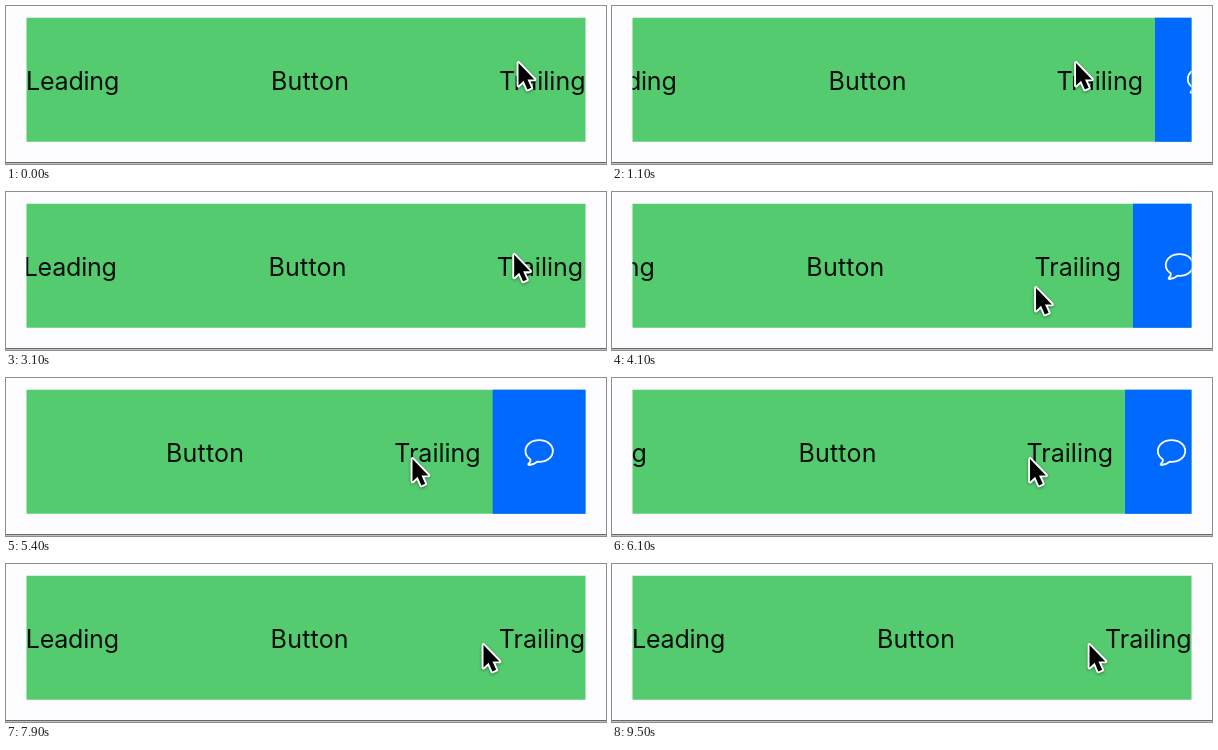
Write an HTML page that moves like this. It is 600 by 158 pixels and loops after 9.6 s.

```html
<!DOCTYPE html>
<html lang="en">
<head>
<meta charset="utf-8">
<title>Swipe action</title>
<style>
  html, body { margin: 0; width: 100%; height: 100%; overflow: hidden; background: #fdfcfe; }
  svg { display: block; width: 600px; height: 158px; }
  text { font: 25px Inter, "Open Sans", sans-serif; fill: #050d08; }
  .cursor { filter: drop-shadow(0 1.5px 1.5px rgba(0, 0, 0, .4)); }
</style>
</head>
<body>
<svg viewBox="0 0 600 158">
  <defs>
    <clipPath id="cell"><rect x="20.5" y="11.8" width="559" height="124"/></clipPath>
  </defs>
  <rect y="156" width="600" height="1.4" fill="#68666a"/>
  <g clip-path="url(#cell)">
    <rect x="20" y="11" width="560" height="126" fill="#55cb6f"/>
    <g id="row">
      <text x="20" y="83.5" letter-spacing="-.2">Leading</text>
      <text x="304" y="83.5" text-anchor="middle" letter-spacing=".2">Button</text>
      <text x="579.5" y="83.5" text-anchor="end">Trailing</text>
      <g transform="translate(591.5 0)">
        <rect y="11" width="120" height="126" fill="#0069ff"/>
        <path d="M37.6 81.2 C34.5 79.2 32.8 76.4 32.8 73 C32.8 66.8 38.8 62.2 46.5 62.2 S60.2 66.8 60.2 73 S54.2 83.8 46.5 83.8 L44.6 83.7 C42.2 85.7 39.4 87 36.4 87 C35.5 87 35.4 86.3 36 85.7 C37.4 84.4 38.3 82.8 37.6 81.2 Z"
              fill="none" stroke="#fff" stroke-width="1.8" stroke-linejoin="round"/>
      </g>
    </g>
  </g>
  <g id="cursor" class="cursor">
    <path d="M1.5 2 V24.5 L6.6 19.8 L10.4 28.4 L14.2 26.8 L10.5 18.4 H17.4 Z"
          fill="#000" stroke="#fff" stroke-width="3.8" paint-order="stroke" stroke-linejoin="round"/>
  </g>
</svg>
<script>
  const LOOP = 9600, STEP = 100;
  const HOME = { x: 511, y: 55 };

  const gestures = [
    { from: 0, to: 2200, row: -97, x: -97 },           // pull out
    { from: 2200, to: 3200, row: 97, x: 95, y: 6 },    // push back
    { from: 3200, to: 3500, x: -16, y: 33 },           // take a new grip
    { from: 3500, to: 4350, row: -88, x: -88 },        // pull out again
    { from: 4350, to: 4650, y: -15 },
    { from: 5450, to: 5650, x: -15 },
    { from: 5650, to: 6850, row: 86, x: 86 }           // close
  ];

  // After each release the row slides to its resting place
  const releases = [
    { at: 4700, row: -17, decay: 150 },
    { at: 6850, row: 19, decay: 250 }
  ];

  const clamp = u => Math.min(1, Math.max(0, u));
  const glide = (t, g) => (1 - Math.cos(Math.PI * clamp((t - g.from) / (g.to - g.from)))) / 2;
  const settle = (t, r) => 1 - Math.exp(-Math.max(0, t - r.at) / r.decay);
  const total = (list, ease, key, t) =>
    list.reduce((sum, item) => sum + (item[key] || 0) * ease(t, item), 0);

  const row = document.getElementById("row");
  const cursor = document.getElementById("cursor");
  const move = (el, x, y) => el.setAttribute("transform", `translate(${x.toFixed(2)} ${y.toFixed(2)})`);

  function draw() {
    const t = Math.floor(performance.now() % LOOP / STEP) * STEP;
    const hand = key => HOME[key] + total(gestures, glide, key, t);
    move(row, total(gestures, glide, "row", t) + total(releases, settle, "row", t), 0);
    move(cursor, hand("x"), hand("y"));
    requestAnimationFrame(draw);
  }
  draw();
</script>
</body>
</html>
```
